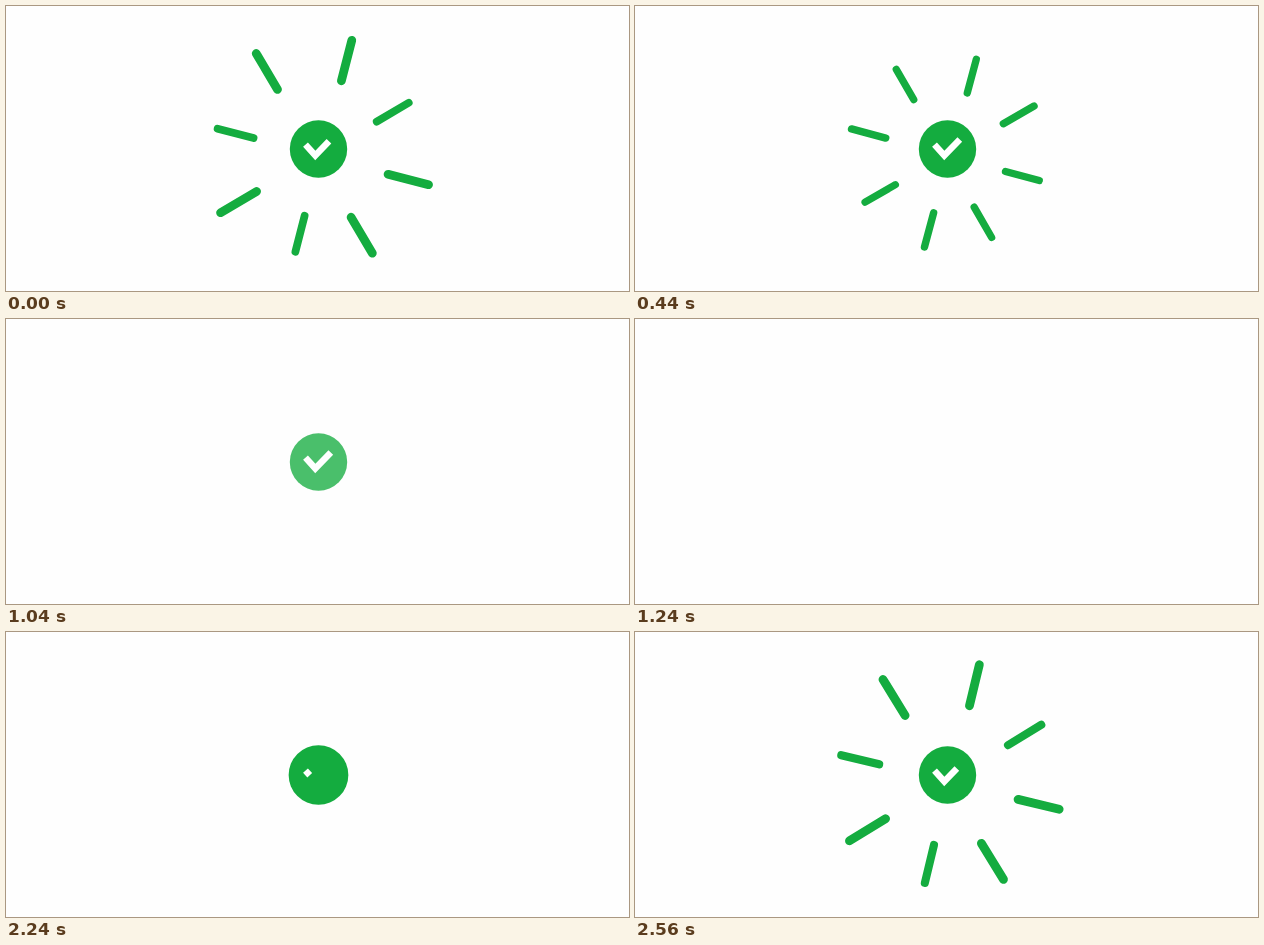
Recreate the animation shown at these times as an HTML page. Size 623 px wide and 285 px high, loop 2.6 s.

```html
<!DOCTYPE html>
<html lang="en">
<head>
<meta charset="utf-8">
<title>Success burst</title>
<style>
  html, body { margin: 0; width: 100%; height: 100%; overflow: hidden; background: #fefefe; }
  svg { display: block; width: 100vw; height: 100vh; }
</style>
</head>
<body>
<svg viewBox="0 0 623 285">
  <g id="rays" stroke="#14ac3f" stroke-width="7.2" stroke-linecap="round"></g>
  <g id="badge">
    <circle id="disc" cx="312.5" fill="#14ac3f"/>
    <path id="check" d="M299.5 138.6L309.3 149.4L324.8 133.4" fill="none" stroke="#fff" stroke-width="6.5"/>
  </g>
</svg>
<script>
const LOOP = 2600;
const START = 1900;      // the badge pops in here, the rest runs past the loop end
const CX = 312.4, CY = 147.8;
const HALF = 17.3;       // half a ray's length
const MIDS = [[24.1, -76.8], [69.6, -38], [74.1, 22], [35.1, 67.7],
              [-17.9, 74.2], [-66.4, 39.2], [-76.9, -19.8], [-41.9, -68.5]];
const EARLY = [1, 4, 6]; // rays that shoot out first

const $ = id => document.getElementById(id);
const part = (t, a, b) => Math.min(1, Math.max(0, (t - a) / (b - a)));
const smooth = u => (1 - Math.cos(Math.PI * u)) / 2;
const easeOut = u => 1 - (1 - u) * (1 - u);
const mix = (a, b, u) => a + (b - a) * u;

const rays = MIDS.map(([x, y], i) => {
  const a = (15 + 45 * i) * Math.PI / 180;
  const dx = HALF * Math.sin(a), dy = -HALF * Math.cos(a);
  const line = document.createElementNS('http://www.w3.org/2000/svg', 'line');
  const ends = { x1: x - dx, y1: y - dy, x2: x + dx, y2: y + dy };
  for (const k in ends) line.setAttribute(k, ends[k]);
  $('rays').append(line);
  return { line, delay: EARLY.includes(i) ? 0 : 120 };
});

const check = $('check');
const checkLen = check.getTotalLength();

// Shoot out, fall back, then swell slowly
function rayScale(t) {
  if (t < 2440) return 1.222 * easeOut(part(t, 2290, 2440));
  if (t < 2705) return mix(1.222, 0.998, smooth(part(t, 2440, 2705)));
  return mix(0.998, 1.033, smooth(part(t, 2705, 3205)));
}

function discRadius(t) {
  return t < 2180
    ? mix(9.8, 31, easeOut(part(t, START, 2180)))
    : mix(31, 28.7, smooth(part(t, 2180, 2300)));
}

function draw(now) {
  let t = now % LOOP;
  if (t < START) t += LOOP;

  const turn = -19 * (1 - easeOut(part(t, 2280, 2669)));
  for (const { line, delay } of rays) {
    const s = rayScale(t - delay);
    line.setAttribute('visibility', s > 0.02 ? 'visible' : 'hidden');
    line.setAttribute('transform', `translate(${CX} ${CY}) rotate(${turn}) scale(${s})`);
  }
  $('rays').setAttribute('opacity', 1 - part(t, 3320, 3580));

  $('disc').setAttribute('r', discRadius(t));
  $('disc').setAttribute('cy', mix(145, 143, part(t, START, 2180)));
  const shown = mix(0.31, 1, part(t, START, 2020));
  $('badge').setAttribute('opacity', shown * (1 - part(t, 3580, 3840)));

  const drawn = easeOut(part(t, 2190, 2750));
  check.setAttribute('visibility', drawn > 0 ? 'visible' : 'hidden');
  check.setAttribute('stroke-dasharray', `${checkLen * drawn} ${checkLen * 2}`);
}

let begin = null;
function tick(now) {
  if (begin === null) begin = now;
  draw(now - begin);
  requestAnimationFrame(tick);
}
draw(0);
requestAnimationFrame(tick);
</script>
</body>
</html>
```
